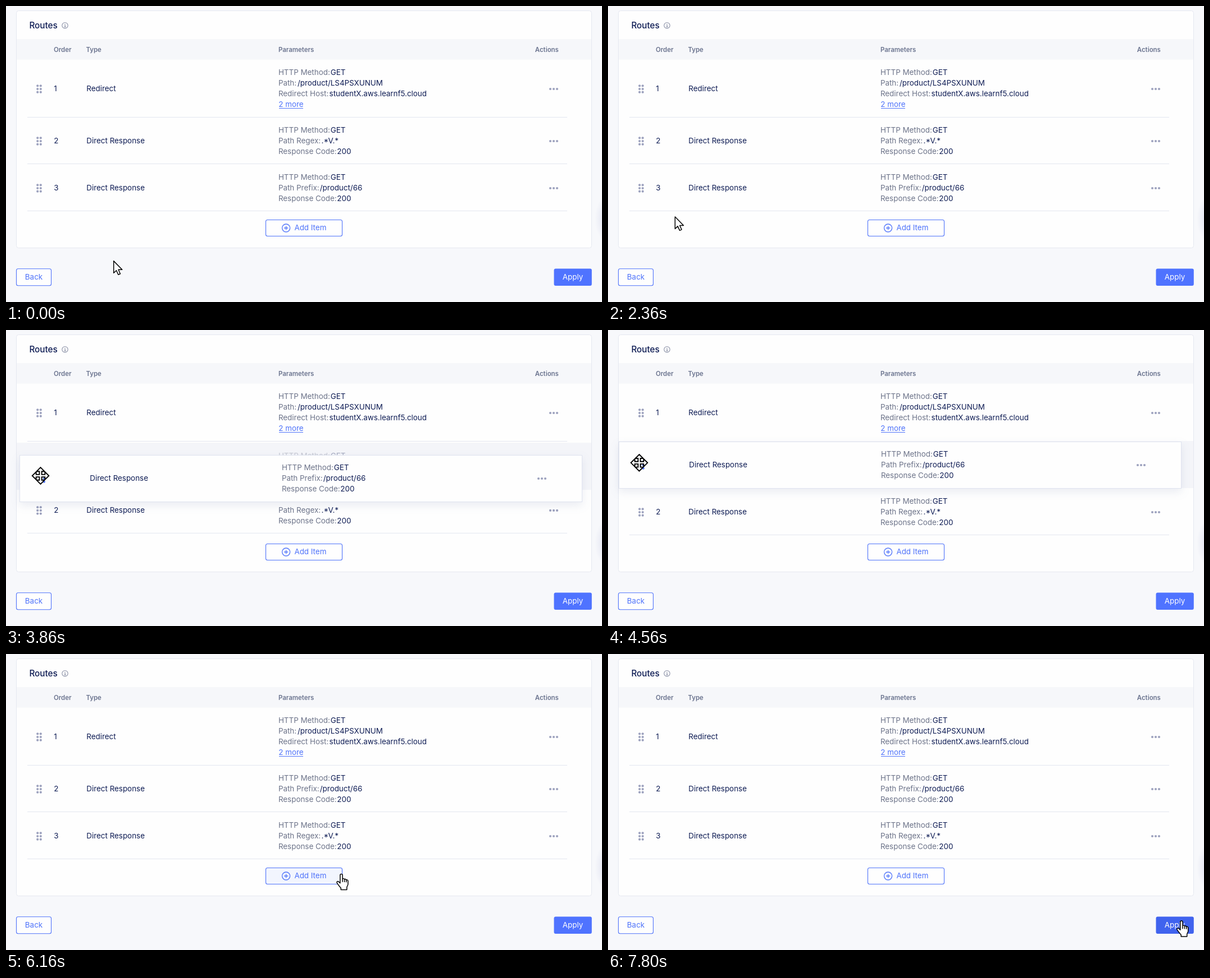
Write an HTML page that moves like this. It is 1061 by 528 pixels and loops after 8960 ms.

```html
<!DOCTYPE html>
<html lang="en">
<head>
<meta charset="utf-8">
<title>Routes</title>
<style>
  html, body { margin: 0; width: 100%; height: 100%; overflow: hidden; background: #f7f8fb; }
  svg { display: block; width: 1061px; height: 528px; }
  text { font: 400 13.4px Inter, sans-serif; fill: #0e1c54; }
  .title { font-size: 15.3px; font-weight: 500; }
  .head { font-size: 11.45px; font-weight: 600; fill: #6b748f; }
  .label { fill: #6c7389; }
  .blue { fill: #4f73fa; }
  .white { fill: #fff; }
  .line { stroke: #e3e6f0; }
  .dots { fill: #9da2be; }
  .outline { fill: #fefefe; stroke: #4f73fa; stroke-width: 1.1; }
  .outline.hover { fill: #f2f5fe; }
  .solid { fill: #4f73ff; }
  .solid.hover { fill: #4063ee; }
  .slot { fill: #f4f5f9; visibility: hidden; }
  .dragged .slot { visibility: visible; }
  .dragged .body { opacity: .35; }
  #card .grip { fill: #4f73fa; }
  #card .panel { fill: #fefefe; stroke: #dfe3ef; filter: drop-shadow(0 6px 8px rgba(60, 75, 140, .1)); }
  #cursor > * { fill: #fff; stroke: #000; stroke-width: 1.5; stroke-linejoin: round; }
  #cursor > #move { stroke-width: 1.9; stroke-linejoin: miter; }
</style>
</head>
<body>
<svg viewBox="0 0 1061 528">
  <defs>
    <radialGradient id="glow">
      <stop offset="0" stop-color="#b9bede" stop-opacity=".45"/>
      <stop offset="1" stop-color="#b9bede" stop-opacity="0"/>
    </radialGradient>
  </defs>
  <rect width="1061" height="528" fill="#f7f8fb"/>
  <rect x="18.5" y="8.5" width="1024" height="423" rx="4" fill="#fefefe" stroke="#e5e8f0"/>
  <rect x="19" y="59" width="1023" height="36.5" fill="#f6f7fa"/>
  <ellipse cx="1072" cy="380" rx="24" ry="42" fill="url(#glow)"/>

  <text class="title" x="41.4" y="39.6">Routes</text>
  <g fill="none" stroke="#8a90a6" stroke-width="1.1">
    <circle cx="105" cy="34.7" r="5.2"/>
    <path d="M104 33.8h1.2v3.6M103.6 37.4h3M104.4 31.7h1.2"/>
  </g>
  <text class="head" x="85" y="82">Order</text>
  <text class="head" x="142.4" y="82">Type</text>
  <text class="head" x="484.9" y="82">Parameters</text>
  <text class="head" x="941.8" y="82">Actions</text>

  <g id="rows"></g>

  <rect id="add" class="outline" x="462.5" y="381.5" width="136" height="29" rx="3"/>
  <g fill="none" stroke="#4f73fa" stroke-width="1.3">
    <circle cx="498.6" cy="396" r="7"/>
    <path d="M495 396h7.2M498.6 392.4v7.2"/>
  </g>
  <text class="blue" x="513.4" y="400.4">Add Item</text>

  <rect class="outline" x="18.5" y="468.8" width="62" height="30" rx="3"/>
  <text class="blue" x="49.5" y="488.4" text-anchor="middle">Back</text>
  <rect id="apply" class="solid" x="975.5" y="468.5" width="67.3" height="30.5" rx="3"/>
  <text class="white" x="1009" y="488.4" text-anchor="middle">Apply</text>

  <g id="card"></g>

  <g id="cursor">
    <path id="arrow" d="M.7 .9V22.2L5.5 17.7L8.9 25.2L12.4 23.7L9.1 16.3H15.8Z"/>
    <path id="move"/>
    <path id="hand" transform="translate(-9.2 -.8)" d="M7 17.5V3.2C7 .5 11.2 .5 11.2 3.2V10.7C11.3 8.6 14.5 8.7 14.7 11.1
      C15 9.7 17.7 9.9 18 12.2C18.4 11.1 21 11.5 21 13.7V19C21 22.4 18.9 23 18.9 25.6V29.3H8.4V26.4
      C6.3 24 3.5 20.3 1.4 17.1C.2 15 2.7 13.3 4.4 14.9Z M11.2 10.7V15.5M14.7 11.1V15.8M18 12.2V16"/>
  </g>
</svg>
<script>
const LOOP = 8960, FPS = 30;
const ROW = 84;                         // height of a three-line row
const SECOND = 240.5, THIRD = SECOND + ROW;
const BASE = 4.5;                       // baseline below a line's centre
const $ = id => document.getElementById(id);

const routes = {
  redirect: ['Redirect', ['HTTP Method:', 577.8, 'GET'], ['Path:', 518.9, '/product/LS4PSXUNUM'],
    ['Redirect Host:', 575.6, 'studentX.aws.learnf5.cloud']],
  regex: ['Direct Response', ['HTTP Method:', 577.8, 'GET'], ['Path Regex:', 561.6, '.*V.*'],
    ['Response Code:', 589.3, '200']],
  prefix: ['Direct Response', ['HTTP Method:', 577.8, 'GET'], ['Path Prefix:', 558.8, '/product/66'],
    ['Response Code:', 589.3, '200']]
};

const text = (x, y, str, cls = '') => `<text class="${cls}" x="${x}" y="${y}">${str}</text>`;

const dots = (xs, ys, cls) => `<g class="dots ${cls}">` +
  ys.map(y => xs.map(x => `<circle cx="${x}" cy="${y}" r="2.1"/>`).join('')).join('') + '</g>';

// Row contents, centred vertically on y = 0
function body(name, num, actionsX) {
  const [type, ...params] = routes[name];
  const more = name === 'redirect';
  const top = more ? -29 : -19;
  let out = dots([56.2, 61.8], [-5.2, .5, 6.2], 'grip') + text(143.3, BASE, type);
  if (num) out += text(85.2, BASE, num, 'num');
  params.forEach(([label, x, value], i) => {
    const y = top + i * 19 + BASE;
    out += text(484.9, y, label, 'label') + text(x, y, value);
  });
  if (more) out += text(485.3, 28 + BASE, '2 more', 'blue') +
    '<path d="M486 35h43" stroke="#4f73fa"/>';
  return out + dots([actionsX - 6, actionsX, actionsX + 6], [.5], '');
}

function row(name, num, y, bottom) {
  return `<g id="${name}" transform="translate(0 ${y})">
    <rect class="slot" x="19" y="-42.5" width="1023" height="${ROW}"/>
    <g class="body">${body(name, num, 975)}</g>
    <path class="line" d="M38 ${bottom}H999"/></g>`;
}

$('rows').innerHTML = row('redirect', 1, 147.5, 51) +
  row('prefix', 3, THIRD, 41) + row('regex', 2, SECOND, 41);
$('card').innerHTML = `<rect class="panel" x="18.5" y="-41" width="1001" height="83"/>` +
  body('prefix', 0, 948);

// Four-way arrow: one quarter, turned three times
const quarter = [[0, -14.8], [7, -7.8], [2.1, -7.8], [2.1, -2.1], [7.8, -2.1], [7.8, -7]];
let pts = [], turn = quarter;
for (let i = 0; i < 4; i++) {
  pts = pts.concat(turn);
  turn = turn.map(([x, y]) => [-y, x]);
}
$('move').setAttribute('d', 'M' + pts.join('L') + 'Z');

const lin = p => p, easeIn = p => p * p, easeOut = p => 1 - (1 - p) ** 2;

// Pointer path: tick, x, y, easing into the point
const path = [
  [45, 191, 454], [72, 113, 369, easeIn], [91, 56, 325, easeOut],
  [101, 56, 325, lin], [105, 63, 315, lin], [110, 66, 297, lin], [116, 61.5, 260, lin], [125, 51, 235, easeOut],
  [133, 51, 235, lin], [160, 260, 317, easeIn], [187, 624, 398, lin], [214, 940, 462, lin], [234, 1021, 475.5, easeOut]
];

function pointer(k) {
  if (k <= path[0][0]) return path[0].slice(1);
  for (let i = 1; i < path.length; i++) {
    const [k0, x0, y0] = path[i - 1], [k1, x1, y1, ease] = path[i];
    if (k <= k1) {
      const p = ease((k - k0) / (k1 - k0));
      return [x0 + (x1 - x0) * p, y0 + (y1 - y0) * p];
    }
  }
  return path[path.length - 1].slice(1);
}

const GRAB = 102, SWAP = 110, SWAPPED = 119, RELEASE = 133, DROPPED = 138;
const clamp = p => Math.min(1, Math.max(0, p));
const move = (id, x, y) => $(id).setAttribute('transform', `translate(${x.toFixed(2)} ${y.toFixed(2)})`);
const show = (id, on) => { $(id).style.display = on ? '' : 'none'; };

function draw(ms) {
  const k = Math.floor((ms + 6.7) * FPS / 1000);
  const [x, y] = pointer(k);
  const dragging = k >= GRAB && k < DROPPED;
  const done = k >= DROPPED;

  // Neighbouring rows trade places
  const swap = 1 - (1 - clamp((k - SWAP) / (SWAPPED - SWAP))) ** 3;
  move('regex', 0, SECOND + ROW * swap);
  move('prefix', 0, THIRD - ROW * swap);
  $('prefix').classList.toggle('dragged', dragging);
  document.querySelector('#prefix .num').textContent = done ? 2 : 3;
  document.querySelector('#regex .num').textContent = done ? 3 : 2;

  // The lifted card trails the pointer, then settles in its slot, on whole pixels
  show('card', dragging);
  if (dragging) {
    const held = Math.min(k, RELEASE);
    const dx = Math.max(1, pointer(held)[0] - 56), dy = pointer(held - 1)[1] - 326;
    const drop = easeOut(clamp((k - RELEASE) / (DROPPED - RELEASE)));
    move('card', Math.round(dx), Math.floor(THIRD + dy - (ROW + dy) * drop) + .5);
  }

  const onGrip = dragging || (x < 68 && y < 336);
  const onAdd = x >= 462 && x <= 599 && y >= 381 && y <= 411;
  const onApply = x >= 975 && y >= 468;
  $('add').classList.toggle('hover', onAdd);
  $('apply').classList.toggle('hover', onApply);
  show('move', onGrip);
  show('hand', onAdd || onApply);
  show('arrow', !onGrip && !onAdd && !onApply);
  move('cursor', x, y);
}

const start = performance.now();
function tick() {
  draw((performance.now() - start) % LOOP);
  requestAnimationFrame(tick);
}
tick();
</script>
</body>
</html>
```
